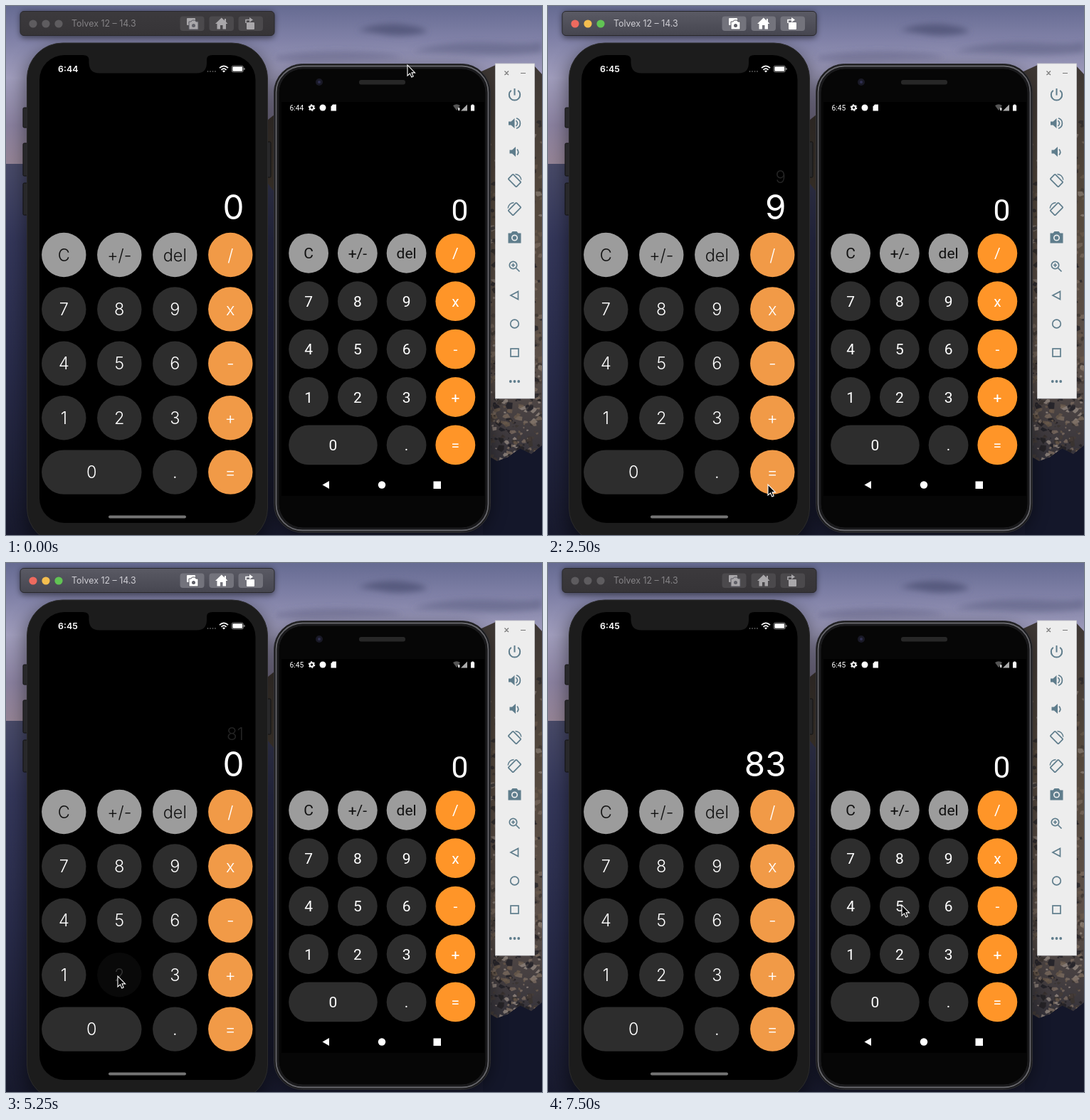
Animation of 753x744 px, one loop 8 s. Source, as an HTML page:

```html
<!DOCTYPE html>
<html lang="en">
<head>
<meta charset="utf-8">
<title>Calculator on two simulators</title>
<style>
  html, body { margin: 0; width: 100%; height: 100%; overflow: hidden; background: #000; }
  svg { display: block; width: 753px; height: 744px; }
  .ios { font-family: Inter, "Open Sans", sans-serif; }
  .droid { font-family: Roboto, sans-serif; }
  .mid { text-anchor: middle; }
  .end { text-anchor: end; }
  .bar { fill: url(#barOff); }
  .cap { fill: #858386; }
  .tool { fill: #4b494c; }
  .glyph { fill: #a9a7aa; stroke: #a9a7aa; }
  .light { fill: #5e5c5f; }
  .on .bar { fill: url(#barOn); }
  .on.grey .bar { fill: url(#barGrey); }
  .on .cap { fill: #cfced4; }
  .on .tool { fill: #73737c; }
  .on.grey .tool { fill: #706d6e; }
  .on .glyph { fill: #fff; stroke: #fff; }
  .on .light { fill: var(--c); }
  .line { fill: none; stroke: #5f7d8c; stroke-width: 1.7; }
  .solid { fill: #5f7d8c; }
</style>
</head>
<body>
<svg viewBox="0 0 753 744" xmlns="http://www.w3.org/2000/svg">
  <defs>
    <linearGradient id="sky" x2="0" y2="1">
      <stop offset="0" stop-color="#666b92"/><stop offset=".2" stop-color="#7f80a6"/>
      <stop offset=".45" stop-color="#a09dbc"/><stop offset=".75" stop-color="#8a819f"/>
      <stop offset="1" stop-color="#958495"/>
    </linearGradient>
    <linearGradient id="sea" x2="0" y2="1">
      <stop offset="0" stop-color="#484a68"/><stop offset=".2" stop-color="#34375a"/>
      <stop offset=".55" stop-color="#282b49"/><stop offset="1" stop-color="#181a2e"/>
    </linearGradient>
    <linearGradient id="hill" x2="0" y2="1">
      <stop offset="0" stop-color="#3d3734"/><stop offset=".35" stop-color="#54483d"/>
      <stop offset=".75" stop-color="#5c5049"/><stop offset="1" stop-color="#34323a"/>
    </linearGradient>
    <linearGradient id="barOn" x2="0" y2="1"><stop stop-color="#5a5a64"/><stop offset="1" stop-color="#464650"/></linearGradient>
    <linearGradient id="barGrey" x2="0" y2="1"><stop stop-color="#504d4e"/><stop offset="1" stop-color="#413e3f"/></linearGradient>
    <linearGradient id="barOff" x2="0" y2="1"><stop stop-color="#3c3a3d"/><stop offset="1" stop-color="#363437"/></linearGradient>
    <filter id="blur" x="-20%" y="-60%" width="140%" height="220%"><feGaussianBlur stdDeviation="4"/></filter>
    <filter id="shade" x="-20%" y="-20%" width="140%" height="140%"><feGaussianBlur stdDeviation="13"/></filter>
    <clipPath id="land"><path id="coast" d="M368 160L378 152L500 125L640 104L668 92L690 82L742 84L753 96V618L738 630L722 622L706 634L690 640L676 632L368 250Z"/></clipPath>
  </defs>

  <rect width="753" height="224" fill="url(#sky)"/>
  <g fill="#575a7e" filter="url(#blur)">
    <path d="M494 34Q520 24 548 25Q584 28 592 36Q570 43 540 41Z"/>
    <path d="M570 64Q620 48 690 52Q740 55 753 50V65Q690 72 640 67Z" opacity=".5"/>
    <path d="M380 70Q440 60 510 65Q540 66 560 73Q470 78 380 77Z" opacity=".4"/>
  </g>
  <rect y="222" width="753" height="522" fill="url(#sea)"/>
  <rect x="670" y="600" width="83" height="144" fill="#14172a"/>
  <use href="#coast" fill="url(#hill)"/>
  <g id="rocks" clip-path="url(#land)"></g>
  <g filter="url(#shade)" opacity=".45">
    <rect x="26" y="60" width="345" height="710" rx="50"/>
    <rect x="377" y="90" width="303" height="655" rx="40"/>
  </g>

  <g id="win">
    <rect x="20" y="8" width="357" height="37" rx="6" opacity=".5" filter="url(#blur)"/>
    <rect class="bar" x="20" y="7.500" width="357" height="34" rx="5" stroke="#29282b"/>
    <circle class="light" style="--c:#ee6a5f" cx="38" cy="25" r="5.600"/>
    <circle class="light" style="--c:#f4be4f" cx="56" cy="25" r="5.600"/>
    <circle class="light" style="--c:#61c454" cx="74" cy="25" r="5.600"/>
    <text class="ios cap" x="92" y="29.300" font-size="12.400">Tolvex 12 – 14.3</text>
    <g class="tool">
      <rect x="244.500" y="14.500" width="34" height="20.500" rx="4"/>
      <rect x="285.500" y="14.500" width="34.500" height="20.500" rx="4"/>
      <rect x="326.500" y="14.500" width="34.500" height="20.500" rx="4"/>
    </g>
    <g class="glyph" stroke-width="0">
      <rect x="254" y="17" width="12" height="10" rx="1"/>
      <path d="M257 22h3l1.500-2h4l1.500 2h3v11h-13z" stroke-width="1" style="stroke:#5b5b62"/>
      <path d="M302.800 16.500L294 25h2.500v7.500h4.500V27h3.500v5.500h4.500V25h2.500L309 22.300V18h-2v2.400z"/>
      <rect x="338" y="23" width="11" height="10" rx="1"/>
      <path d="M337 24V19.500h6" fill="none" stroke-width="1.600"/><path d="M342 16l5 3.500-5 3.500z"/>
    </g>
    <circle cx="263.500" cy="27.500" r="2.500" fill="#606068"/>
  </g>

  <g fill="#28282a" stroke="#111">
    <rect x="24" y="143" width="8" height="28" rx="1.500"/><rect x="24" y="193" width="8" height="46" rx="1.500"/>
    <rect x="24" y="249" width="8" height="45" rx="1.500"/><rect x="364" y="191" width="8" height="50" rx="1.500"/>
  </g>
  <rect x="29.500" y="52" width="338" height="704" rx="50" fill="#1c1c1c" stroke="#2b2b2b"/>
  <rect x="47" y="69" width="303.500" height="658" rx="35"/>
  <path d="M108 69Q116 69 116.500 75V80Q117 94.500 131 94.500H268Q282 94.500 282 80V75Q282 69 290 69Z" fill="#1c1c1c"/>
  <text class="ios" id="clockA" x="73" y="93" font-size="12.400" font-weight="600" fill="#fff"></text>
  <g fill="#555"><circle cx="283.500" cy="92" r="1"/><circle cx="287" cy="92" r="1"/><circle cx="290.500" cy="92" r="1"/><circle cx="294" cy="92" r="1"/></g>
  <g fill="none" stroke="#fff" stroke-width="1.800"><path d="M300 87.200Q306 81.500 312 87.200M302.500 89.800Q306 86.500 309.500 89.800"/></g>
  <path d="M304 91.500Q306 89.700 308 91.500L306 93.500Z" fill="#fff"/>
  <rect x="317" y="84" width="16.500" height="9" rx="2.500" fill="none" stroke="#888" stroke-width=".9"/>
  <rect x="318.300" y="85.300" width="14" height="6.400" rx="1.300" fill="#fff"/><rect x="334.300" y="87" width="1.200" height="3" fill="#999"/>
  <rect x="144" y="716.500" width="109" height="4" rx="2" fill="#747474"/>

  <rect x="376.500" y="81.500" width="304" height="659" rx="40" fill="#19191b" stroke="#303034"/>
  <rect x="379.500" y="84.500" width="298" height="653" rx="37" fill="none" stroke="#66666b" stroke-width="1.800"/>
  <rect x="383" y="88" width="291" height="646" rx="34" fill="#060606" stroke="#1c1c1e"/>
  <rect x="387" y="135" width="285" height="554"/>
  <rect x="496" y="104" width="65" height="6.500" rx="3" fill="#272727"/>
  <circle cx="440" cy="107" r="5" fill="#191926"/><circle cx="440" cy="107" r="2" fill="#303050"/>
  <text class="droid" id="clockB" x="398.500" y="146.700" font-size="10.200" fill="#fff"></text>
  <g fill="#fff">
    <circle cx="429.500" cy="143" r="2.700" fill="none" stroke="#fff" stroke-width="2"/>
    <circle cx="429.500" cy="143" r="4.200" fill="none" stroke="#fff" stroke-width="1.200" stroke-dasharray="2.200 2.200"/>
    <circle cx="445" cy="143" r="4.500"/>
    <path d="M456.500 141.500L459 138.500H464V147.500H456.500Z"/>
    <path d="M628 140Q633 136.500 638 140L633 147Z" fill="#555"/><path d="M635 143h2.500v4h-2.500z" opacity=".8"/>
    <path d="M639 147.500H648V138.500Z" fill="#aaa"/>
    <path d="M653 139.500h1.300v-1h2.500v1h1.300v8h-5.100z"/>
    <path d="M444.500 673.500L454 668V679Z"/><circle cx="528" cy="673.500" r="5.200"/><rect x="600.500" y="668.500" width="10.500" height="10.500"/>
  </g>

  <g id="keys"></g>
  <g fill="#fff">
    <text class="ios end" id="memo" x="334" y="249.300" font-size="24" font-weight="300" fill-opacity=".14"></text>
    <text class="ios end" id="main" x="334.500" y="300.300" font-size="47.500" font-weight="400"></text>
    <text class="droid end" x="649.500" y="302" font-size="42.500">0</text>
  </g>

  <rect x="687.500" y="81" width="55" height="471" fill="#ededed" stroke="#c9c9cc" stroke-width=".8"/>
  <g class="line">
    <path d="M700.500 91.500l5.500 5.500m0-5.500l-5.500 5.500M723 94.500h7" stroke="#777" stroke-width="1.200"/>
    <path d="M714.500 116v9.500M709.800 118.800a7.700 7.700 0 1 0 9.400 0" stroke-width="2"/>
    <path d="M716.500 161q4 4 0 8M717 157.800a7.500 7.500 0 0 1 0 14.400M718 201.500q3.500 4 0 8"/>
    <g id="turn">
      <rect x="-4.800" y="-8" width="9.600" height="16" rx="1" transform="rotate(-45)"/>
      <path d="M1-9Q8-8.500 9.300-1" stroke-width="1.400"/>
    </g>
    <circle cx="712.500" cy="364.500" r="5.200"/><path d="M716.500 368.500l5 5M710 364.500h5M712.500 362v5"/>
    <path d="M719.500 401.500V412.500L709 407Z"/><circle cx="714.500" cy="447" r="5.800"/><rect x="709" y="482" width="11" height="11"/>
  </g>
  <g class="solid">
    <path d="M706 162.500h3.500l5-4.500v14l-5-4.500H706zM707.500 202.500h3.500l5-4.500v14l-5-4.500h-3.500z"/>
    <path d="M705.500 319.500h4l2-2.500h6l2 2.500h4v14h-18z"/>
    <circle cx="708.800" cy="528" r="1.900"/><circle cx="714.500" cy="528" r="1.900"/><circle cx="720.200" cy="528" r="1.900"/>
  </g>
  <circle cx="714.500" cy="326" r="3.700" fill="none" stroke="#ededed" stroke-width="1.700"/>

  <path id="cursor" d="M0 0V15L3.500 11.800L5.800 17L8.200 16L6 10.900H10.600Z" fill="#000" stroke="#fff" stroke-width="1.100"/>
</svg>
<script>
const NS = "http://www.w3.org/2000/svg";
const $ = id => document.getElementById(id);

function add(parent, tag, attrs, text) {
  const el = document.createElementNS(NS, tag);
  for (const k in attrs) el.setAttribute(k, attrs[k]);
  if (text) el.textContent = text;
  return parent.appendChild(el);
}

// Rotate icons: one and its mirror image
const turn = $("turn"), mirror = turn.cloneNode(true);
turn.setAttribute("transform", "translate(714.5 245.500)");
mirror.removeAttribute("id");
mirror.setAttribute("transform", "translate(714.5 285.500) scale(-1 1)");
turn.parentNode.appendChild(mirror);

// Rocky slope, finer and more contrasty towards the shore
let seed = 11;
const rnd = () => (seed = seed * 16807 % 2147483647) / 2147483647;
const tones = ["#211f22", "#3a332f", "#6b5b4c", "#7d6d61", "#463d38", "#1d1d24", "#968a82"];
for (let i = 0; i < 520; i++) {
  const x = 668 + rnd() * 85, y = 95 + 545 * Math.sqrt(rnd()), r = 1.5 + rnd() * 5;
  const pts = [0, 1, 2, 3, 4].map(k => {
    const a = k * 1.257 + rnd(), q = r * (.6 + rnd() * .6);
    return (x + q * Math.cos(a)).toFixed(1) + "," + (y + q * .8 * Math.sin(a)).toFixed(1);
  });
  add($("rocks"), "polygon", { points: pts.join(" "), fill: tones[rnd() * 7 | 0], opacity: .4 + y / 1600 });
}

// Keypads
const rows = ["C +/- del /", "7 8 9 x", "4 5 6 -", "1 2 3 +", "0 . ="].map(r => r.split(" "));

function keypad(p) {
  const keys = {};
  rows.forEach((row, j) => row.forEach((label, i) => {
    const wide = label === "0", col = j === 4 && i ? i + 1 : i;
    const last = col === 3, top = j === 0 && !last;
    const x = p.x + p.dx * col, y = p.y + p.dy * j, w = 2 * p.r + (wide ? p.dx : 0);
    const g = add($("keys"), "g", {});
    add(g, "rect", {
      x: x - p.r, y: y - p.r, width: w, height: 2 * p.r, rx: p.r,
      fill: top ? "#9c9c9c" : last ? p.accent : "#2d2d2d"
    });
    add(g, "text", {
      class: p.font + " mid", x: x - p.r + w / 2, y: y + p.base,
      "font-size": p.size, "font-weight": p.weight, fill: top ? "#111" : "#fff"
    }, label);
    keys[label] = g;
  }));
  return keys;
}

const keys = keypad({ x: 81.3, y: 350, dx: 78, dy: 76.4, r: 31.2, accent: "#f19a47",
  font: "ios", size: 23.5, weight: 300, base: 8.6 });
keypad({ x: 425.1, y: 347.8, dx: 68.75, dy: 67.4, r: 27.9, accent: "#ff9528",
  font: "droid", size: 21, weight: 400, base: 7.6 });

// time, cursor x, cursor y, main display, memory, pressed key, window state
const steps = [
  [0, 564, 83, "0", "", "", ""],
  [250, 497, 160, "0", "", "", ""],
  [500, 350, 325, "0", "", "", ""],
  [750, 240, 428, "0", "", "", "on"],
  [1000, 236, 430, "9", "", "9", "on"],
  [1250, 272, 430, "9", "", "", "on"],
  [1500, 305, 427, "9", "", "x", "on"],
  [1750, 286, 429, "0", "9", "", "on"],
  [2000, 240, 431, "9", "9", "9", "on"],
  [2250, 272, 560, "9", "9", "", "on"],
  [2500, 309, 673, "9", "9", "", "on"],
  [2750, 309, 669, "9", "9", "=", "on"],
  [3000, 309, 669, "81", "", "", "on"],
  [3250, 307, 650, "81", "", "", "on"],
  [3500, 303, 612, "81", "", "", "on"],
  [4000, 302, 580, "81", "", "", "on grey"],
  [4250, 302, 556, "81", "", "", "on grey"],
  [4500, 306, 574, "81", "", "+", "on grey"],
  [4750, 282, 579, "0", "81", "", "on grey"],
  [5000, 190, 582, "0", "81", "", "on"],
  [5250, 157, 581, "0", "81", "2", "on"],
  [5500, 162, 583, "2", "81", "", "on"],
  [5750, 240, 628, "2", "81", "", "on"],
  [6000, 306, 658, "2", "81", "=", "on"],
  [6250, 308, 658, "83", "", "", "on"],
  [6500, 350, 618, "83", "", "", "on"],
  [6750, 445, 530, "83", "", "", "on"],
  [7000, 505, 480, "83", "", "", "on"],
  [7250, 500, 481, "83", "", "", "on"],
  [7500, 497, 481, "83", "", "", ""]
];

let shown = null;
function draw(t) {
  const s = steps.filter(r => r[0] <= t).pop();
  if (s === shown) return;
  shown = s;
  const [at, x, y, main, memo, pressed, state] = s;
  $("cursor").setAttribute("transform", `translate(${x} ${y})`);
  $("main").textContent = main;
  $("memo").textContent = memo;
  $("win").setAttribute("class", state);
  $("clockA").textContent = $("clockB").textContent = at < 2000 ? "6:44" : "6:45";
  for (const k in keys) keys[k].setAttribute("opacity", k === pressed ? .2 : 1);
}

const start = performance.now();
function tick(now) {
  draw(Math.max(0, now - start) % 8000);
  requestAnimationFrame(tick);
}
draw(0);
requestAnimationFrame(tick);
</script>
</body>
</html>
```
